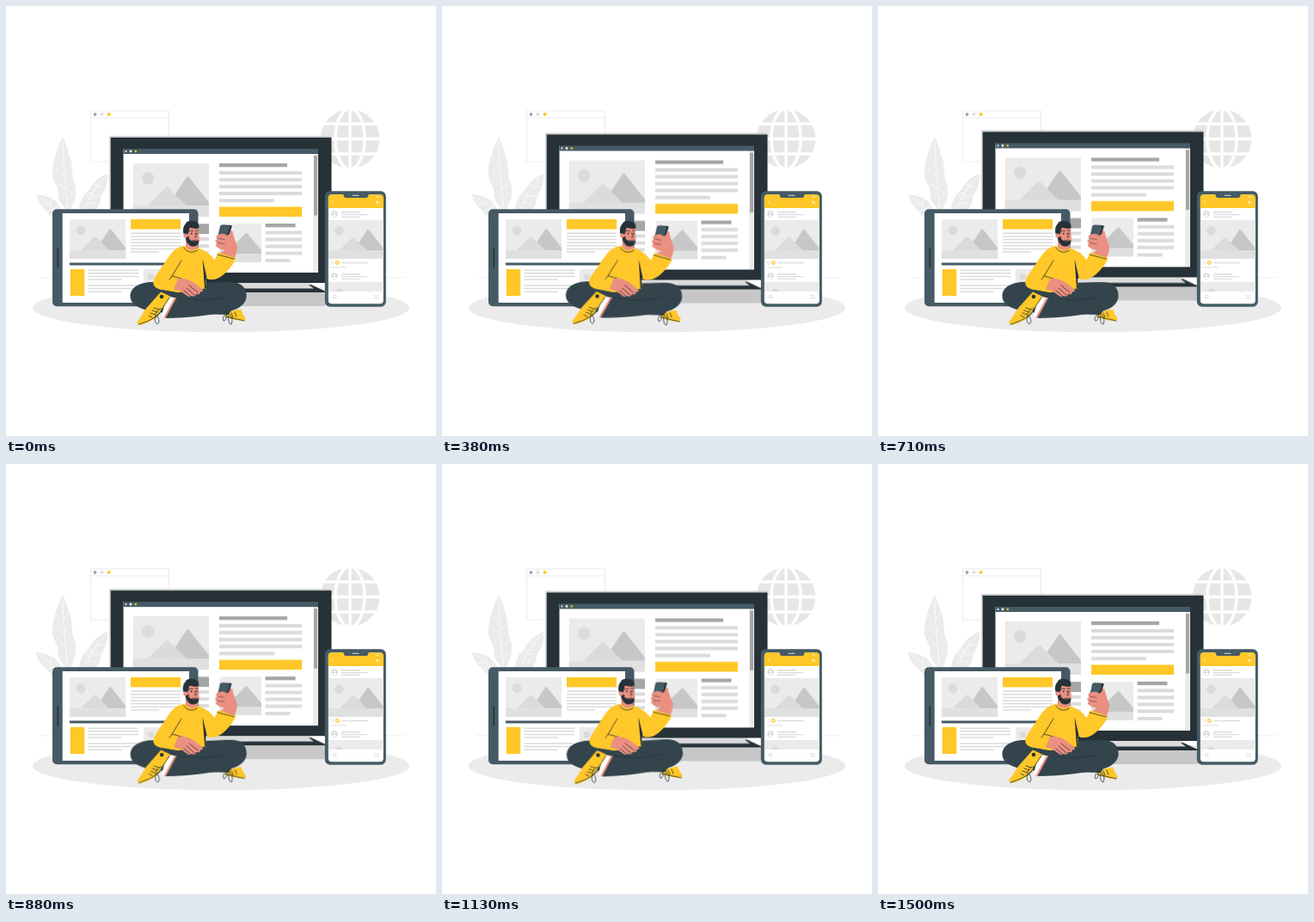
Animation, 500 px wide and 500 px high, one loop 1.54 s. Source, as an HTML page:

```html
<!DOCTYPE html>
<html lang="en">
<head>
<meta charset="utf-8">
<title>Responsive devices</title>
<style>
html, body { margin: 0; width: 100%; height: 100%; overflow: hidden; background: #fff; }
svg { display: block; width: 100vw; height: 100vh; }
.ink { fill: #263238; }
.slate { fill: #455a64; }
.pants { fill: #33444c; }
.sun { fill: #ffc727; }
.skin { fill: #eb8f80; }
.white { fill: #fff; }
.pale { fill: #ebebeb; }
.soft { fill: #dbdbdb; }
.mid { fill: #c7c7c7; }
.grey { fill: #a6a6a6; }
.bars { fill: none; stroke: #dbdbdb; }
.head { fill: none; stroke: #a6a6a6; }
.pen { fill: none; stroke: #263238; stroke-width: .8; stroke-linecap: round; stroke-linejoin: round; }

/* 37 equal ticks: 36 of motion and one of rest */
.float { animation: float 1540ms -4ms infinite; }
.sway { transform-origin: 212px 310px; animation: sway 1540ms -4ms infinite; }
@keyframes float {
  0% { transform: translateY(0); animation-timing-function: steps(18); }
  48.649% { transform: translateY(-7px); animation-timing-function: steps(18); }
  97.297%, 100% { transform: translateY(0); }
}
@keyframes sway {
  0% { transform: rotate(0deg); animation-timing-function: steps(9); }
  24.324% { transform: rotate(1deg); animation-timing-function: steps(18); }
  72.973% { transform: rotate(-1deg); animation-timing-function: steps(9); }
  97.297%, 100% { transform: rotate(0deg); }
}
</style>
</head>
<body>
<svg viewBox="0 0 500 500" xmlns="http://www.w3.org/2000/svg">
<defs>
  <symbol id="pic" viewBox="0 0 88 62">
    <path class="pale" d="M0 0H88V62H0z"/>
    <circle class="soft" cx="17.5" cy="17.5" r="7.3"/>
    <path class="mid" d="M40 49 62 16q1.500-2 3 0L88 45v4z"/>
    <path class="soft" d="M17 49 38 28q1.500-1.500 3 0L62 49z"/>
    <path fill="#e0e0e0" d="M0 49H88V62H0z"/>
  </symbol>
  <pattern id="specks" width="11" height="12" patternUnits="userSpaceOnUse">
    <g fill="#ffe391">
      <circle cx="2" cy="3" r=".6"/><circle cx="7.500" cy="5.500" r=".55"/><circle cx="4" cy="9.500" r=".6"/>
    </g>
  </pattern>
  <clipPath id="feed"><path d="M375 321h64v11h-64z"/></clipPath>
  <clipPath id="disc"><circle cx="400" cy="154.500" r="34.500"/></clipPath>
</defs>

<!-- backdrop -->
<ellipse class="pale" cx="250" cy="351" rx="219" ry="28.300"/>
<path d="M40 315.800H463" stroke="#e3e3e3" stroke-width=".6"/>
<g fill="none" stroke="#e6e6e6" stroke-width=".8">
  <path d="M98.500 122H189.500V181H98.500zM98.500 130H189.500"/>
</g>
<circle class="grey" cx="103.500" cy="126" r="1.900"/>
<circle class="soft" cx="111.500" cy="126" r="1.900"/>
<circle class="sun" cx="119.600" cy="126" r="2"/>
<g clip-path="url(#disc)">
  <circle cx="400" cy="154.500" r="34.500" fill="#e6e6e6"/>
  <g fill="none" stroke="#fff" stroke-width="3.400">
    <path d="M365 154.500h70M365 137h70M365 172h70M400 119v71"/>
    <ellipse cx="400" cy="154.500" rx="17" ry="35"/>
  </g>
</g>
<g class="pale">
  <path d="M66 152C59 166 53 184 54 197c1 8 5 10 6 16 1 7 0 12 5 18l7 8c7-8 10-18 9-28-1-8-4-10-4-18 0-12-5-28-11-41z"/>
  <path d="M35 219c2 9 5 13 10 17 4 4 6 8 11 12l10-2c-1-10-4-17-11-21-6-4-13-5-20-6z"/>
  <path d="M118 195c-10 4-17 10-21 18-2 4-7 6-9 12-2 5-3 8-3 14h15c8-4 9-9 10-14 0-5 4-8 6-14 2-5 2-10 2-16z"/>
</g>
<g fill="none" stroke="#fff" stroke-width=".7">
  <path d="M66 156c0 24 3 56 6 83M67 184l-10-10M68 198l-12-10M69 213l-9-9M67 180l8-10M68 194l9-9M70 212l10-9M71 226l9-10"/>
  <path d="M37 221c11 6 20 14 26 26M50 230l-9 1M56 236l-8 2M52 231l0-6M58 238l2-8"/>
  <path d="M116 198c-11 12-20 25-25 40M108 207l-9 1M101 217l-9 3M106 210l9 1M99 221l11 0M95 229l10 1"/>
</g>

<!-- monitor -->
<g class="float">
  <path class="mid" d="M215 332H372V346q0 3-3 3H215z"/>
  <path class="soft" d="M215 321H352L368 331H215z"/>
  <path class="ink" d="M215 328.500H358L352 324.300H355L372 332V333H215z"/>
  <path class="mid" d="M120.300 151.200H378V320H120.300z"/>
  <path class="ink" d="M121.800 153H378.500V322H121.800z"/>
  <path class="white" d="M136.500 166H363V310H136.500z"/>
  <path class="slate" d="M136.500 166H363V172H136.500z"/>
  <circle class="mid" cx="139.500" cy="169" r="1.300"/>
  <circle class="white" cx="145" cy="169" r="1.400"/>
  <circle class="sun" cx="150.700" cy="169" r="1.300"/>
  <path class="pale" d="M357.300 172H363V310H357.300z"/>
  <path class="grey" d="M358 174H362V243.500H358z"/>
  <use href="#pic" x="147.500" y="183" width="88.500" height="62.300"/>
  <path class="head" stroke-width="4.200" d="M248 185.200h79M301.500 255.200h35"/>
  <path class="bars" stroke-width="4" d="M248 194h96M248 202h96M248 210h96M248 218h96M248 226.300h64M301.500 263.500h42.500M301.500 271.500h42.500M301.500 279.500h42.500M301.500 287.500h42.500M301.500 296h29M200 271h36M200 279h36M200 287h36M200 295h36"/>
  <path class="sun" d="M248 233.500h96V245h-96z"/>
  <path class="grey" d="M200 253.300h36V265h-36z"/>
  <path class="pale" d="M248.500 253.300H297V298H248.500z"/>
  <path class="mid" d="M255 288 278 265q1.500-2 3 0L297 284v4z"/>
  <path class="soft" d="M248.500 273 263 288H248.500z"/>
  <path fill="#e0e0e0" d="M248.500 288H297V298H248.500z"/>
</g>

<!-- tablet -->
<rect class="slate" x="54" y="236.300" width="169.500" height="113" rx="5"/>
<path class="white" d="M65.700 241H213V345H65.700z"/>
<path class="pen" style="stroke-width:1.500" d="M60.300 282V304"/>
<use href="#pic" x="74" y="248" width="65.500" height="46"/>
<path class="sun" d="M145 248h58v11.500h-58zM74.800 306H91.300V337H74.800z"/>
<path class="bars" stroke-width="1.500" d="M145 264.300h58M145 268h58M145 271.600h58M145 275.200h58M145 278.800h58M145 286h33M145 282.400h58M95.500 307.200h58.500M95.500 310.800h58.500M95.500 314.400h58.500M95.500 318h39M95.500 325h58.500M95.500 328.600h58.500M95.500 332.200h39"/>
<path class="slate" d="M74 298.500H203V301.500H74z"/>
<use href="#pic" x="159.500" y="306" width="44" height="31"/>

<!-- phone -->
<rect class="slate" x="370.800" y="215.300" width="71" height="134.500" rx="6"/>
<rect class="white" x="374.800" y="219.300" width="64" height="127" rx="4"/>
<path class="sun" d="M374.800 235V223q0-3.700 4-3.700h56q4 0 4 3.700v12z"/>
<path class="slate" d="M391 218.500q2 .5 2 2.500 0 2 3 2h22q3 0 3-2 0-2 2-2.500z"/>
<path d="M403 220.300h7" stroke="#dbdbdb" stroke-linecap="round"/>
<path d="M381 227l-1.500 1.500 1.500 1.500M430 222h4" fill="none" stroke="#fff" stroke-width=".8"/>
<circle cx="432" cy="228.500" r="1.700" fill="#ffe9ad"/>
<g id="who">
  <circle class="soft" cx="382" cy="242" r="3.700"/>
  <path d="M380 245c0-3 4-3 4 0z" class="white"/><circle class="white" cx="382" cy="241" r="1.200"/>
  <path class="bars" stroke-width="1.400" d="M390 239.800h22M390 242.600h30M390 245.400h21"/>
</g>
<use href="#who" y="72"/>
<use href="#pic" x="374.800" y="249" width="64" height="45"/>
<circle cx="380" cy="298.500" r="1.500" fill="none" stroke="#dbdbdb" stroke-width=".7"/>
<circle cx="385.300" cy="298.500" r="1.800" fill="none" stroke="#ffc727" stroke-width="1.300"/>
<path class="bars" stroke-width="1.200" d="M390 298.700h31M378 304h18"/>
<g clip-path="url(#feed)"><use href="#pic" x="374.800" y="321" width="64" height="45"/></g>
<path class="bars" stroke-width="1" d="M380 339.500v-2l2-1.500 2 1.500v2zM428 337h6M428 339.500h6"/>

<!-- man -->
<g class="sway">
  <!-- legs and shoes -->
  <path class="sun" d="M256 356 273 352.500q2 6 5.500 10.500.5 2.500-2 3.300-11-.6-22-5z"/>
  <path class="pants" d="M174 321c-18-1-30 6-29.500 17 .5 10 12 14 24 17l20 2 70 2 6-8c10-1 15-7 15-15 0-10-8-16-22-15l-24 1z"/>
  <path class="white" d="M187 337l12 3-13 23-5-3z"/>
  <path class="skin" d="M196 339l3 1-13 23-2.500-1z"/>
  <path class="pants" d="M199 338 185.500 363c28 0 54-4 74-8 13-2.500 20-10 20-18-16 4-50 6-80 1z"/>
  <path class="sun" d="M180 332.500 190 337q1 1 .3 2.500L176 361q-7 6-18 9.600-3.500 1-6-2.600 6-8 11-16.500z"/>
  <circle class="ink" cx="181" cy="338" r="2.300"/>
  <path class="pen" d="M154 370.500q13-4 22-10L190 339M168 357l6 2M170 354l6 2M172 351l6 2M166 360l4 2M174 358c3-6 6-7 8-5-1 4-4 6-8 7M174 360c-2 6 0 9 2 10 3-2 2-6 0-9M255 361l22 5M262 357l2 5M266 356l2 5M258 357c-5 2-7 6-5 9 3 0 4-5 3-8M258 357c5 4 6 8 4 13-3 0-4-5-3-10"/>
  <path d="M199 339c20 4 40 3 58-1" fill="none" stroke="#263238" stroke-width=".6"/>

  <!-- raised hand -->
  <path class="skin" d="M248 288 256 283 255 277 259 262q5-3 5 3l5 15q0 6-3 13z"/>
  <path class="ink" d="M250.500 255.500q.5-1 2-1l9 .6q1.600.2 1 2L258 270l-11.500-2z"/>
  <path class="slate" d="M249 256q.5-1.200 2-1.200l8 .8q1.600.2 1.200 1.600L256.500 269l-10-1.500z"/>
  <path class="skin" d="M247 266q6-3 10 1l5-3 4 14-8 6c-5 0-10-1-14-5q-1-3 2-2.700-3-1-2.500-3.700.5-2 3-1.200-2.500-1.400-2-3.700.5-2 2.500-1.700z"/>
  <path class="pen" style="stroke-width:.5" d="M246 270l8 1.500M246 275.500l8 1"/>

  <!-- sweater -->
  <path class="skin" d="M209 268V282q7 6 14 1V274z"/>
  <g id="knit">
    <path id="top" class="sun" d="M208 279c-9 1-14 6-19 13l-16 24c-4 8 0 13 10 14l17 3 33-5-1-12c3 2 8 3 13 1 8-3 18-14 22.500-23.500L247 286.500l-4.500 9c-4-6-10-11-20-14-4 4-11 3-14.500-2.500z"/>
    <use href="#top" style="fill:url(#specks)"/>
    <path d="M208 279c-9 1-14 6-19 13l-16 24c-4 8 0 13 10 14l17 3 33-5-1-12c3 2 8 3 13 1 8-3 18-14 22.500-23.500L247 286.500l-4.500 9c-4-6-10-11-20-14-4 4-11 3-14.500-2.500z" fill="url(#specks)"/>
  </g>
  <path class="ink" d="M228.500 294 233.500 315.500 232 318 233 328 231 328z"/>
  <path class="pen" d="M206.500 281q7 9 16 3M204 296l-11 18 11 3M193 314l-3 4M246 289l19 5"/>

  <!-- resting hand -->
  <path class="skin" d="M200 317c8-1 14 2 19 5l9 7q2 2-.2 3.200l-2.200.3q.8 2.200-2 2.800l-2.600-.2q0 2.200-2.600 2.600l-3.400-.7q-1 1.800-3.500.7l-9-6.500-7.500-2z"/>
  <path class="pen" d="M213 325l10 8M210 328l9 8M207 331l7 6"/>

  <!-- head -->
  <path class="skin" d="M209 258q7-6 14.500-2l1.300 14q0 8-5 9.500-7 1-10-7z"/>
  <path class="ink" d="M208.500 269c1 5 3 8 6 10 5 1.500 8 0 9.600-3.500l.2-3.500-3 1.200-4 .3q-4-1.500-4.500-6z"/>
  <path class="skin" d="M212 265l4 0 5 6-5 2-3-2z"/>
  <path class="ink" d="M206.500 265c-1-5-.5-9 2.500-12 1-3 5-3.500 8-3 5 0 8 3 7.500 8-4 2-8 0-11-.2-.5 3-1 6-2.500 8.500z"/>
  <circle class="skin" cx="208.800" cy="267" r="2.500"/>
  <circle class="ink" cx="215.800" cy="264.500" r=".9"/>
  <circle class="ink" cx="222" cy="264.500" r=".9"/>
  <path class="pen" d="M213.500 262q2-1.500 4-.6M220.500 261.200l2.800-.2M219.800 264l1.800 4.500-2 .4M217 272.500q2.500 1 4.500-.5"/>
</g>
</svg>
</body>
</html>
```
